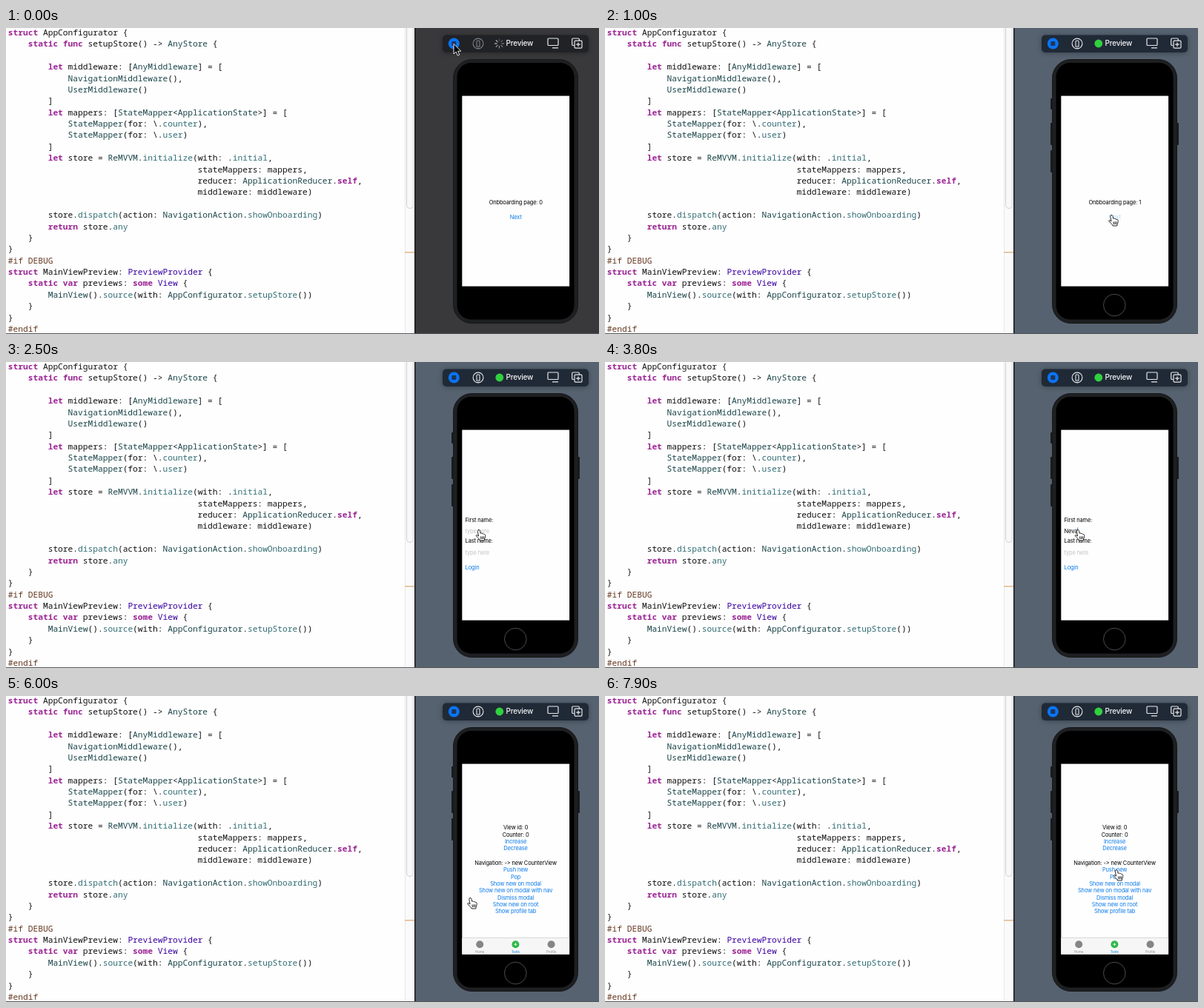
Animation of 800 by 413 pixels, one loop 8000 ms. Source, as an HTML page:

```html
<!DOCTYPE html>
<html lang="en">
<head>
<meta charset="utf-8">
<title>Live preview</title>
<style>
  html, body { margin: 0; width: 100%; height: 100%; overflow: hidden; background: #fefefe; }
  svg { display: block; width: 100%; height: 100%; }
  text { white-space: pre; }
  #code { font: 500 11.22px "Noto Sans Mono", "DejaVu Sans Mono", monospace; fill: #111; }
  .keyword { fill: #9b2393; font-weight: 600; }
  .type { fill: #1c464a; }
  .member { fill: #326d74; }
  .system { fill: #3900a0; }
  .directive { fill: #643820; }
  #toolbar { filter: drop-shadow(0 1px 3px rgba(0, 0, 0, .3)); }
  .ui { font: 7.46px Inter, "Open Sans", sans-serif; letter-spacing: -.13px; fill: #000; }
  .ui .link { fill: #0a7aea; }
  .ui .hint { fill: #c2c2c6; }
  .mid { text-anchor: middle; }
  .tab { font-size: 4.4px; letter-spacing: 0; fill: #8c8c8c; text-anchor: middle; }
</style>
</head>
<body>
<svg viewBox="0 0 800 413" preserveAspectRatio="none">
  <rect width="800" height="413" fill="#fefefe"/>
  <g id="code"></g>

  <rect x="538" width="13" height="413" fill="#fafafa"/>
  <path d="M538.5 0V413" stroke="#e8e8e8"/>
  <path d="M540.5 0V239a4.5 4.5 0 0 0 9 0V0" fill="#f8f8f8" stroke="#d2d2d2"/>
  <path d="M538 302.8H551" stroke="#e0b283" stroke-width="1.4"/>

  <rect id="panel" x="552" width="248" height="413"/>
  <rect x="551" width="1.5" height="413" fill="#16181b"/>
  <rect y="412" width="800" height="1" fill="#55575a"/>

  <rect id="toolbar" x="589" y="9.5" width="197" height="23.5" rx="5"/>
  <circle cx="604.3" cy="21" r="7.5" fill="#0a74f5"/>
  <rect x="601.3" y="18" width="6" height="6" rx="1" fill="#1d3558"/>
  <g id="device" fill="none" stroke-width="1.1">
    <circle cx="637" cy="21" r="6.9"/>
    <path d="M635 25V18.2q0-1.2 1.2-1.2h1.6q1.2 0 1.2 1.2V25zM635.6 27.3h2.8"/>
  </g>
  <g id="spinner" stroke="#aeb2b8" stroke-width="1.3" stroke-linecap="round"></g>
  <circle id="ready" cx="665.8" cy="21" r="5.4" fill="#30d13f"/>
  <text x="674.5" y="24.4" fill="#f4f5f6" style="font:500 10px Inter,sans-serif;letter-spacing:-.2px">Preview</text>
  <g fill="none" stroke="#e6e8ea" stroke-width="1.2">
    <path d="M732 14h12q1 0 1 1v7.5q0 1-1 1h-12q-1 0-1-1V15q0-1 1-1zM737 26.800h8"/>
    <path d="M766.5 23.5H765q-1.3 0-1.3-1.3V15.3q0-1.3 1.3-1.3h7q1.3 0 1.3 1.3V17"/>
    <rect x="767" y="17.2" width="10" height="10" rx="1.4"/>
    <path d="M769.2 22.2h5.6M772 19.4V25"/>
  </g>

  <g id="buttons" fill="#1a1b1d">
    <rect x="601" y="95" width="4" height="15" rx="1"/>
    <rect x="601" y="128" width="4" height="30" rx="1"/>
    <rect x="601" y="165" width="4" height="30" rx="1"/>
    <rect x="770" y="128" width="4" height="30" rx="1"/>
  </g>
  <rect x="603.5" y="42.5" width="168" height="356" rx="25" fill="#1e1f21" stroke="#17181a"/>
  <rect x="608.5" y="47" width="158" height="346.500" rx="19" fill="#000"/>
  <rect x="615.300" y="91.600" width="144.800" height="257" fill="#fefefe"/>
  <circle id="home" cx="687.3" cy="374" r="14.8" fill="none" stroke="#4a4b4d" stroke-width="1"/>

  <g id="onboarding" class="ui mid">
    <text id="page" x="687.8" y="237.900"></text>
    <text id="next" class="link" x="687.8" y="257.900">Next</text>
  </g>
  <g id="login" class="ui">
    <text x="619.600" y="215.800">First name:</text>
    <text id="first" x="619.600" y="231"></text>
    <text x="619.600" y="244.300">Last name:</text>
    <text id="last" x="619.600" y="259.700"></text>
    <text id="submit" class="link" x="619.600" y="279.900">Login</text>
    <rect id="caret" width="1" height="9.500" fill="#2f7bf0"/>
  </g>
  <g id="tests" class="ui">
    <g id="rows" class="mid"></g>
    <rect x="615.300" y="326" width="144.800" height="22.600" fill="#f6f6f6"/>
    <path d="M615.300 326.300H760.100" stroke="#c8c8c8" stroke-width=".7"/>
    <g id="tabs"></g>
  </g>

  <path id="arrow" d="M0 0V13.500L3.200 10.600 5.300 15.600 7.700 14.600 5.600 9.700H9.800Z" fill="#000" stroke="#fff" stroke-width=".9"/>
  <g id="hand" stroke="#111" stroke-width=".9" stroke-linejoin="round" stroke-linecap="round">
    <path fill="#fff" d="M4 .7C5.200 .3 5.900 1 6 2.200L6.600 5.200C7.800 4.600 8.600 5 9 5.800 10 5.200 10.800 5.700 11.200 6.500 12.500 6.200 13.200 7 13.200 8.300 13.300 10.500 12.500 11.800 12 13L11.800 15H6L5.500 13.700C4 12 2.500 10.500 1 9 .2 8.200 1 7.200 2 7.600L4 9 2.800 2.400C2.700 1.400 3.200 .9 4 .7Z"/>
    <path fill="none" d="M7 9.800l.3 3M9 9.700l.1 3M10.900 9.600v2.900"/>
  </g>
</svg>
<script>
const LOOP = 8000, STEP = 100;
const $ = id => document.getElementById(id);
const show = (id, on) => { $(id).style.display = on ? '' : 'none'; };
const clamp = v => Math.max(0, Math.min(1, v));
const ease = v => v * v * (3 - 2 * v);

const source = `struct AppConfigurator {
    static func setupStore() -> AnyStore {

        let middleware: [AnyMiddleware] = [
            NavigationMiddleware(),
            UserMiddleware()
        ]
        let mappers: [StateMapper<ApplicationState>] = [
            StateMapper(for: \\.counter),
            StateMapper(for: \\.user)
        ]
        let store = ReMVVM.initialize(with: .initial,
                                      stateMappers: mappers,
                                      reducer: ApplicationReducer.self,
                                      middleware: middleware)

        store.dispatch(action: NavigationAction.showOnboarding)
        return store.any
    }
}
#if DEBUG
struct MainViewPreview: PreviewProvider {
    static var previews: some View {
        MainView().source(with: AppConfigurator.setupStore())
    }
}
#endif`;

const grammar = [
  ['directive', /^#.*/],
  ['keyword', /\b(?:struct|static|func|let|return|var|some|self)\b/],
  ['plain', /(?<=struct )\w+/],
  ['system', /\b(?:PreviewProvider|View)\b/],
  ['type', /\b[A-Z]\w+/],
  ['member', /(?<=\.)\w+/]
];
const tokens = new RegExp(grammar.map(([name, re]) => `(?<${name}>${re.source})`).join('|'), 'g');
const escapeHtml = s => s.replace(/&/g, '&amp;').replace(/</g, '&lt;').replace(/>/g, '&gt;');

function highlight(line) {
  let out = '', end = 0;
  for (const m of line.matchAll(tokens)) {
    const kind = Object.keys(m.groups).find(k => m.groups[k]);
    out += escapeHtml(line.slice(end, m.index)) + `<tspan class="${kind}">${escapeHtml(m[0])}</tspan>`;
    end = m.index + m[0].length;
  }
  return out + escapeHtml(line.slice(end));
}

$('code').innerHTML = source.split('\n')
  .map((line, i) => `<text x="2.8" y="${10 + i * 15.385}">${highlight(line)}</text>`).join('');

$('rows').innerHTML = [
  'View id: 0', 'Counter: 0', '*Increase', '*Decrease', '',
  'Navigation: -> new CounterView', '*Push new', '*Pop', '*Show new on modal',
  '*Show new on modal with nav', '*Dismiss modal', '*Show new on root', '*Show profile tab'
].map((row, i) => {
  const y = 180.3 + i * 9.33 + (i > 4 ? 1.2 : 0);
  const cls = row[0] === '*' ? ' class="link"' : '';
  return `<text x="687.6" y="${y}"${cls}>${escapeHtml(row.replace('*', ''))}</text>`;
}).join('');

$('tabs').innerHTML = ['Home', 'Tests', 'Profile'].map((label, i) => {
  const x = 639.2 + i * 48.2, active = i === 1;
  const plus = `<path d="M${x - 2} 335.200h4M${x} 333.200v4" stroke="#fff" stroke-width=".9"/>`;
  return `<circle cx="${x}" cy="335.200" r="5" fill="${active ? '#2fb84c' : '#858585'}"/>` + (active ? plus : '') +
    `<text class="tab" x="${x}" y="346.800"${active ? ' style="fill:#0a7aea"' : ''}>${label}</text>`;
}).join('');

$('spinner').innerHTML = Array.from({ length: 8 }, (_, i) =>
  `<path d="M0-3.400V-6" transform="rotate(${i * 45})" opacity="${0.3 + i * 0.1}"/>`).join('');

// Pointer stops: time, x, y
const stops = [
  [300, 604, 21.5], [800, 679, 252], [1900, 679, 252], [2400, 633.5, 226],
  [5200, 633.5, 226], [5600, 622, 272], [6000, 622, 272], [6700, 728, 342],
  [7200, 728, 342], [7800, 685.5, 234], [LOOP, 685.5, 234]
];
function pointer(t) {
  const i = stops.findIndex(s => s[0] >= t);
  if (i === 0) return stops[0].slice(1);
  const [t0, x0, y0] = stops[i - 1], [t1, x1, y1] = stops[i];
  const k = ease((t - t0) / (t1 - t0));
  return [x0 + (x1 - x0) * k, y0 + (y1 - y0) * k];
}

const taps = [900, 1400];
const LOGIN_AT = 1800, TESTS_AT = 5800, LIVE_AT = 400, FOCUS_AT = 2600, TAB_AT = 3900;
const typed = (word, t, start) => word.slice(0, Math.max(0, Math.floor((t - start) / 200) + 1));

function setField(id, value) {
  $(id).textContent = value || 'type here';
  $(id).setAttribute('class', value ? '' : 'hint');
}

function mix(a, b, k) {
  return `rgb(${a.map((v, i) => Math.round(v + (b[i] - v) * k))})`;
}

function render(t) {
  const live = t >= LIVE_AT;
  const tint = 1 - (1 - clamp(t / 300)) ** 2;
  $('panel').setAttribute('fill', mix([57, 57, 60], [86, 98, 112], tint));
  $('toolbar').setAttribute('fill', mix([33, 34, 38], [32, 41, 54], tint));
  $('device').setAttribute('stroke', live ? '#e6e8ea' : '#7e838a');
  show('spinner', !live);
  show('ready', live);
  show('buttons', live);
  show('home', live);
  $('spinner').setAttribute('transform', `translate(665.500 21) rotate(${t / 100 * 45})`);

  show('onboarding', t < LOGIN_AT);
  show('login', t >= LOGIN_AT && t < TESTS_AT);
  show('tests', t >= TESTS_AT);

  const page = taps.filter(tap => t >= tap).length;
  $('page').textContent = `Onbboarding page: ${page}`;
  const sinceTap = page ? t - taps[page - 1] : LOOP;
  $('next').setAttribute('opacity', 0.3 + 0.7 * clamp((sinceTap - 100) / 200));

  setField('first', typed('Neva', t, 2900));
  setField('last', typed('Orl', t, 4200));
  $('submit').setAttribute('opacity', t >= 5700 ? 0.3 : 1);
  const focused = t >= FOCUS_AT && t < TESTS_AT;
  show('caret', focused);
  if (focused) {
    const field = $(t < TAB_AT ? 'first' : 'last');
    const filled = field.getAttribute('class') !== 'hint';
    $('caret').setAttribute('x', 619.6 + (filled ? field.getComputedTextLength() : 0));
    $('caret').setAttribute('y', field.getAttribute('y') - 7.5);
  }

  const [x, y] = pointer(t);
  const pointing = t >= 600;
  show('arrow', !pointing);
  show('hand', pointing);
  $(pointing ? 'hand' : 'arrow').setAttribute('transform', `translate(${x} ${y})`);
}

const began = performance.now();
function tick() {
  const t = (performance.now() - began) % LOOP;
  render(Math.floor(t / STEP) * STEP);
  requestAnimationFrame(tick);
}
tick();
</script>
</body>
</html>
```
